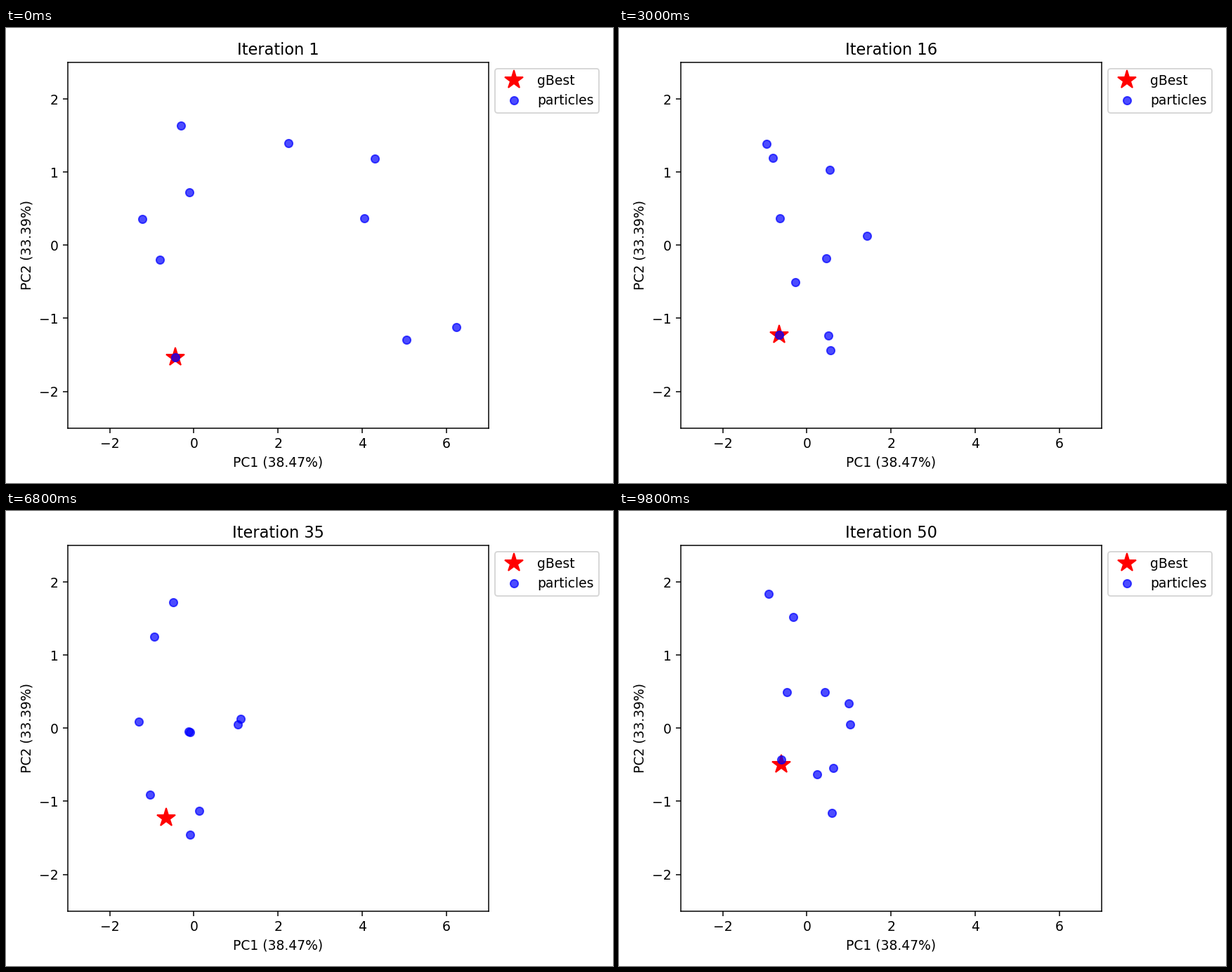
A matplotlib script that plays this animation: 864 px wide and 648 px high, repeating every 10 s.

```python
import numpy as np
import matplotlib.pyplot as plt
from matplotlib.animation import FuncAnimation

WIDTH, HEIGHT, DPI = 864, 648, 135
ITERATIONS = 50
STEP_MS = 200

# Where each particle starts and where it ends up.
START = np.array([
    (-.30, 1.64), (2.24, 1.40), (4.29, 1.18), (-.11, .72), (-1.23, .36),
    (4.05, .37), (-.80, -.20), (-.44, -1.535), (5.04, -1.29), (6.235, -1.12)])
END = np.array([
    (-.33, 1.52), (1.02, .055), (.995, .34), (-.915, 1.84), (-.48, .49),
    (.42, .495), (.62, -.54), (-.615, -.43), (.25, -.635), (.595, -1.16)])

# Iterations at which one particle finds a better position.
BEST = {1: (-.44, -1.535), 12: (-.84, -1.29), 16: (-.655, -1.23), 40: (-.615, -.50)}
FINDER = 7

rng = np.random.default_rng(4)
phase = rng.uniform(0, 2 * np.pi, START.shape)
speed = rng.uniform(0.6, 1.4, START.shape)


def global_best(it):
    return BEST[max(k for k in BEST if k <= it)]


def swarm(it):
    """Particles settle exponentially while swinging around their path."""
    u = (it - 1) / (ITERATIONS - 1)
    pull = (1 - u) * np.exp(-(it - 1) / 9)
    fade = np.sin(np.pi * u) ** 0.4
    swing = np.array([0.5, 0.65]) * np.sin(speed * it + phase)
    drift = np.array([-0.4, 0])
    pos = END + (START - END) * pull + fade * (swing + drift)
    pos = np.clip(pos, (-1.4, -1.6), (6.3, 2.0))
    if it in BEST:
        pos[FINDER] = BEST[it]
    return pos


fig, ax = plt.subplots(figsize=(WIDTH / DPI, HEIGHT / DPI), dpi=DPI)
fig.subplots_adjust(left=87.6 / WIDTH, right=687 / WIDTH,
                    top=1 - 49 / HEIGHT, bottom=1 - 569.6 / HEIGHT)
star, = ax.plot([], [], "r*", markersize=15, label="gBest")
dots, = ax.plot([], [], "bo", alpha=0.7, label="particles")
ax.set(xlim=(-3, 7), ylim=(-2.5, 2.5),
       xticks=range(-2, 7, 2), yticks=range(-2, 3),
       xlabel="PC1 (38.47%)", ylabel="PC2 (33.39%)")
title = ax.set_title("Iteration 1")
ax.legend(bbox_to_anchor=(1, 1), loc="upper left")


def draw(i):
    it = i + 1
    x, y = global_best(it)
    star.set_data([x], [y])
    dots.set_data(*swarm(it).T)
    title.set_text(f"Iteration {it}")
    return star, dots, title


anim = FuncAnimation(fig, draw, frames=ITERATIONS, interval=STEP_MS,
                     init_func=lambda: draw(0), repeat=True, repeat_delay=0)
plt.show()
```
